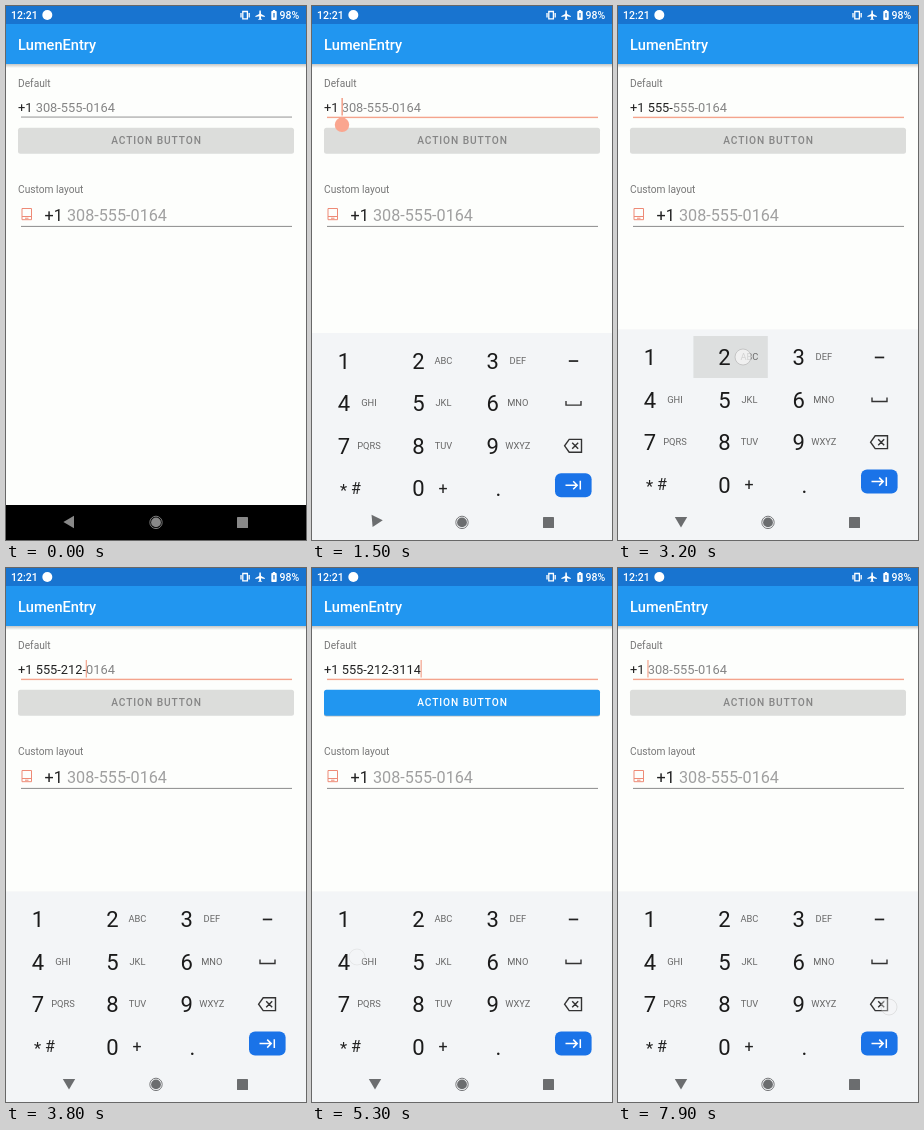
These frames come from a looping animation (300 by 534 pixels, 8000 ms). An HTML page with a canvas:

```html
<!DOCTYPE html>
<html lang="en">
<head>
<meta charset="utf-8">
<title>Number entry</title>
<style>
  html, body { margin: 0; width: 100%; height: 100%; overflow: hidden; background: #fdfefc; }
  canvas { display: block; width: 300px; height: 534px; }
</style>
</head>
<body>
<canvas id="stage"></canvas>
<script>
const W = 300, H = 534, LOOP = 8000, STEP = 100;
const FONT = 'Roboto, Arial, sans-serif';
const HINT = '308-555-0164', NUMBER = '555-212-3114';
const BLUE = '#2196f0', ACCENT = '#f4a48d', INK = '#222', MUTED = '#a0a0a0';
const FOCUS = 1300, HOLD = 6500, RELEASE = 7600;

const canvas = document.getElementById('stage');
const ctx = canvas.getContext('2d');
const ratio = window.devicePixelRatio || 1;
canvas.width = W * ratio;
canvas.height = H * ratio;

// Taps: time, finger x and y, and whether the key lights up
const taps = [
  [2200, 125, 393, 1], [2400, 125, 393, 1], [2600, 125, 393, 1],
  [3200, 125, 351, 1], [3400, 62, 351, 0], [3600, 125, 351, 1],
  [4400, 197, 351, 0], [4600, 40, 351, 0], [4800, 40, 351, 0], [5200, 45, 389, 0]
];

// Each edit sets the number of digits from its time on
const edits = [[FOCUS, 0], ...taps.map((tap, i) => [tap[0] + STEP, i + 1])];
for (let i = 0; i < 9; i++) edits.push([6900 + Math.round(i * 7 / 8) * STEP, 9 - i]);
edits.push([7900, 0]);

function text(str, x, y, size, color, { weight = 400, align = 'left', spacing = 0 } = {}) {
  ctx.font = `${weight} ${size}px ${FONT}`;
  ctx.textAlign = align;
  ctx.letterSpacing = spacing + 'px';
  ctx.fillStyle = color;
  ctx.fillText(str, x, y);
  const width = ctx.measureText(str).width;
  ctx.letterSpacing = '0px';
  return width;
}

function rect(x, y, w, h, color) {
  ctx.fillStyle = color;
  ctx.fillRect(x, y, w, h);
}

function round(x, y, w, h, r, color) {
  ctx.fillStyle = color;
  ctx.beginPath();
  ctx.roundRect(x, y, w, h, r);
  ctx.fill();
}

function disc(x, y, r, color) {
  ctx.fillStyle = color;
  ctx.beginPath();
  ctx.arc(x, y, r, 0, Math.PI * 2);
  ctx.fill();
}

function shape(points, color) {
  ctx.fillStyle = color;
  ctx.beginPath();
  points.forEach(([x, y]) => ctx.lineTo(x, y));
  ctx.closePath();
  ctx.fill();
}

function stroke(path, color, width) {
  ctx.strokeStyle = color;
  ctx.lineWidth = width;
  ctx.stroke(new Path2D(path));
}

function statusBar() {
  rect(0, 0, W, 18, '#1874d0');
  text('12:21', 5, 13, 10.5, '#fff', { weight: 500 });
  disc(41.3, 9, 5, '#fff');
  stroke('M236.8 5.5h4.6v7.4h-4.6zM235 7v4.5M243.2 7v4.5', '#fff', 1.3);
  shape([[253.4, 4.5], [254.8, 4.5], [255, 8], [258.8, 10], [258.8, 11.1], [255, 10.2],
    [255, 12.6], [256.3, 13.8], [251.9, 13.8], [253.2, 12.6], [253.2, 10.2],
    [249.4, 11.1], [249.4, 10], [253.2, 8]], '#fff');
  round(265.3, 5, 5.4, 9, 0.8, '#fff');
  rect(266.8, 4, 2.4, 1.5, '#fff');
  rect(267.4, 7, 1.2, 4.5, '#1874d0');
  text('98%', 273.5, 13, 10.5, '#fff', { weight: 500 });
}

function appBar() {
  const shade = ctx.createLinearGradient(0, 58, 0, 62);
  shade.addColorStop(0, 'rgba(0,0,0,.22)');
  shade.addColorStop(1, 'rgba(0,0,0,0)');
  rect(0, 58, W, 4, shade);
  rect(0, 18, W, 40, BLUE);
  text('LumenEntry', 12, 43.8, 14.6, '#fff', { weight: 500 });
}

function format(count) {
  let out = '', left = count;
  for (const ch of NUMBER) {
    if (ch !== '-' && left-- <= 0) break;
    if (ch === '-' && !count) break;
    out += ch;
  }
  return out;
}

function field(t) {
  const focused = t >= FOCUS;
  const [last, count] = edits.filter(e => e[0] <= t).pop() || [0, 0];
  const typed = format(count);

  text('Default', 12, 81, 10.2, '#777');
  let x = 12 + text('+1 ', 12, 105.5, 12.83, INK);
  x += text(typed, x, 105.5, 12.83, INK);
  text(HINT.slice(typed.length), x, 105.5, 12.83, '#858585');
  rect(15, focused ? 110.7 : 110.6, 271, focused ? 1.4 : 0.9, focused ? ACCENT : '#888');

  const ready = count === 10;
  if (ready) round(12, 122.6, 276, 26, 2.5, 'rgba(0,0,0,.25)');
  round(12, 121.7, 276, 26, 2.5, ready ? BLUE : '#dcdddb');
  text('ACTION BUTTON', 150.5, 138.4, 10.2, ready ? '#fff' : '#858585',
    { weight: 500, align: 'center', spacing: 0.91 });

  const handle = focused && t < 2300;
  if (focused && Math.floor((t - last) / 500) % 2 === 0) {
    rect(x - 0.3, 92, handle ? 1.6 : 1.2, 17.5, ACCENT);
  }
  if (handle) {
    shape([[30, 110.5], [35.5, 115], [30, 121], [24.5, 115]], '#faa68f');
    disc(30, 118.8, 7.2, '#faa68f');
  }
}

function customField() {
  text('Custom layout', 12, 186.5, 10.2, '#777');
  stroke('M16 202.5h9.5v11.2H16zM16 210.5h9.5M19 212.2h3.5', '#ee8a76', 1);
  text('+1', 38.5, 214.5, 16.2, INK);
  text(HINT, 61, 214.5, 16.2, MUTED);
  rect(15, 219.9, 271, 1, '#8c8c8c');
}

const colX = c => 1 + c * 74.4;
const rowY = r => 330 + r * 42.2;

function highlight(x, y) {
  const c = Math.floor((x - 1) / 74.4), r = Math.floor((y - 330) / 42.2);
  rect(colX(c), rowY(r), 74.4, 42, '#dddfdf');
}

function keys() {
  const labels = ['', 'ABC', 'DEF', 'GHI', 'JKL', 'MNO', 'PQRS', 'TUV', 'WXYZ'];
  labels.forEach((label, i) => {
    const x = 32 + (i % 3) * 74.4, y = 351.2 + Math.floor(i / 3) * 42.4;
    text(String(i + 1), x, y + 8.2, 22, '#1b1b1b', { align: 'center' });
    text(label, x + 25, y + 3.2, 9.3, '#666', { align: 'center' });
  });
  text('*', 28, 486, 16.5, '#222');
  text('#', 39, 484, 16, '#222');
  text('0', 106.4, 486.5, 22, '#1b1b1b', { align: 'center' });
  text('+', 131, 484, 16, '#222', { align: 'center' });
  text('.', 186.5, 486.5, 22, '#1b1b1b', { align: 'center' });

  rect(256.8, 350.6, 9.4, 1.7, '#222');
  stroke('M254 391.5v4h15v-4', '#333', 1.4);
  stroke('M257.2 429.8h12.3v12.8h-12.3l-4.6-6.4zM260.2 433.2l6 6M266.2 433.2l-6 6', '#333', 1.4);
  round(243, 463.6, 36.6, 24, 6, '#1a73e8');
  stroke('M253.5 475.6h11.5M261.2 471.6l4 4l-4 4M268.3 471.2v8.8', '#fff', 1.5);
}

function finger(x, y, alpha) {
  ctx.save();
  ctx.globalAlpha = alpha;
  disc(x, y, 8, 'rgba(245,246,246,.75)');
  ctx.strokeStyle = '#bbb';
  ctx.lineWidth = 0.8;
  ctx.stroke();
  ctx.restore();
}

function keyboard(t) {
  const left = Math.max(0, 1600 - t) / STEP;
  ctx.save();
  ctx.globalAlpha = left > 1 ? 0.75 : 1;
  ctx.translate(0, 3.6 * left ** 3);
  rect(0, 323.4, W, H, '#f3f5f7');
  const held = t >= HOLD && t < RELEASE;
  const now = taps.find(tap => t >= tap[0] && t < tap[0] + 2 * STEP);
  const pressed = now && t < now[0] + STEP;
  if (pressed && now[3]) highlight(now[1], now[2]);
  if (held) highlight(272, 433);
  keys();
  if (now) finger(now[1], now[2], pressed ? 1 : 0.3);
  if (held) finger(272, 433, 1);
  if (t >= 7800) finger(271, 439, t < 7900 ? 1 : 0.45);
  ctx.restore();
}

function navBar(t) {
  const color = t > FOCUS ? '#6b6d6f' : '#888';
  const left = Math.min(1, Math.max(0, (1600 - t) / 300));
  ctx.save();
  ctx.translate(63, 516);
  ctx.rotate(left ** 1.15 * Math.PI / 2);
  shape([[-6.2, -5], [6.2, -5], [0, 5.6]], color);
  ctx.restore();
  disc(150, 516.4, 4.9, color);
  ctx.beginPath();
  ctx.arc(150, 516.4, 6.2, 0, Math.PI * 2);
  ctx.strokeStyle = color;
  ctx.lineWidth = 0.9;
  ctx.stroke();
  round(231, 511, 11, 11, 0.6, color);
}

function draw(t) {
  ctx.setTransform(ratio, 0, 0, ratio, 0, 0);
  rect(0, 0, W, H, '#fdfefc');
  statusBar();
  appBar();
  field(t);
  customField();
  rect(0, 499, W, 35, '#000');
  if (t > FOCUS) keyboard(t);
  navBar(t);
}

const start = performance.now();
function tick() {
  const t = (performance.now() - start) % LOOP;
  draw(Math.floor(t / STEP) * STEP);
  requestAnimationFrame(tick);
}
tick();
</script>
</body>
</html>
```
